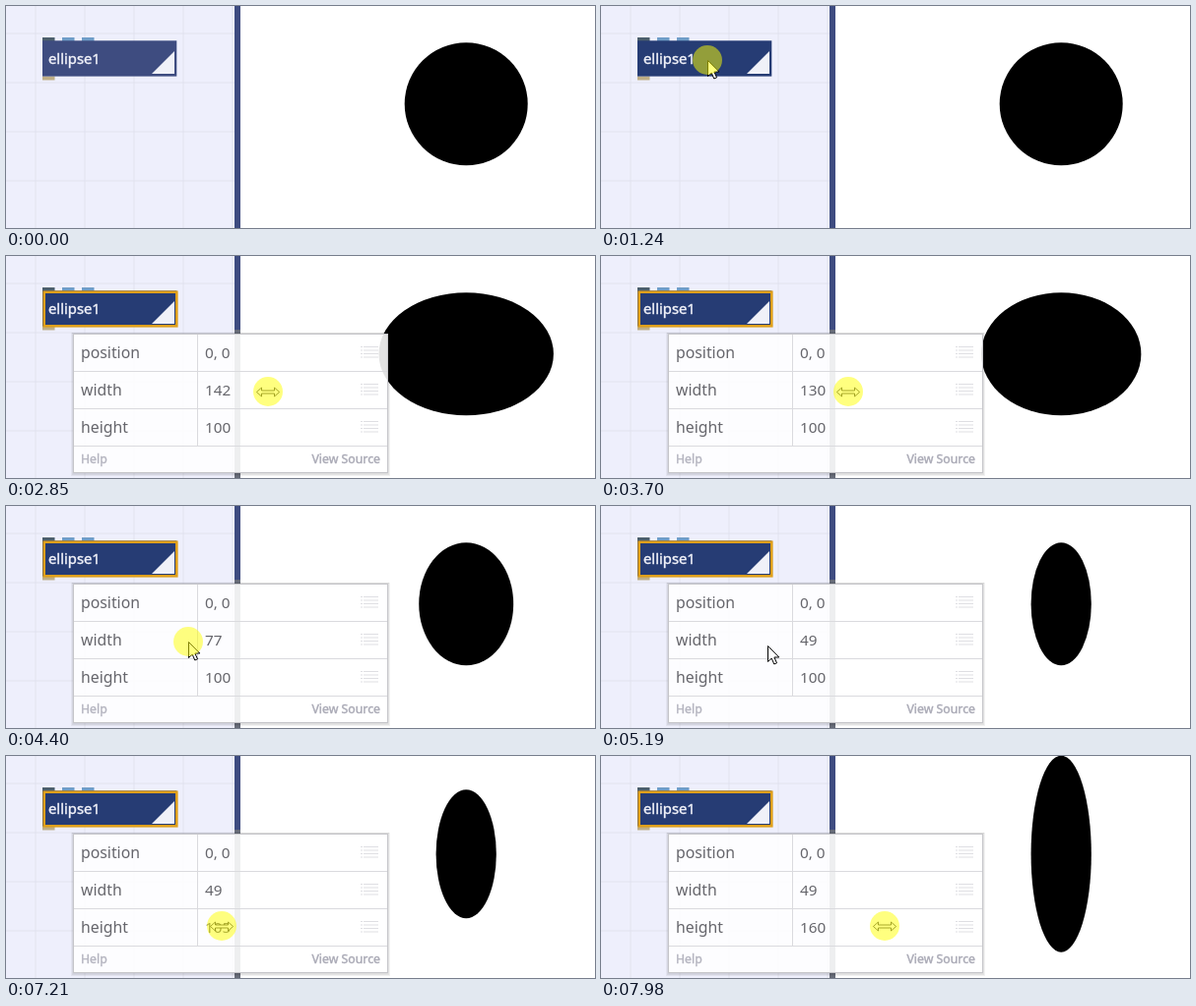
Write an HTML page that moves like this. It is 598 px wide and 226 px high and loops after 8000 ms.

```html
<!DOCTYPE html>
<html lang="en">
<head>
<meta charset="utf-8">
<title>Ellipse node</title>
<style>
  html, body { margin: 0; width: 100%; height: 100%; overflow: hidden; background: #fff; }
  svg { display: block; font-family: "Noto Sans", "Open Sans", sans-serif; }
  .label { font-size: 15.8px; fill: #66666c; }
  .value { font-size: 15.3px; fill: #66666c; }
  .title, .small { stroke: currentColor; fill: currentColor; stroke-width: .4px; }
  .title { font-size: 14.8px; color: #f2f3fa; }
  .small { font-size: 12.3px; color: #b5b5c0; }
  .link { color: #a9a9b5; }
</style>
</head>
<body>
<svg width="598" height="226" viewBox="0 0 598 226">
  <defs>
    <pattern id="grid" width="50" height="50" x="29.5" y="27.5" patternUnits="userSpaceOnUse">
      <path d="M.5 0V50M0 .5H50" stroke="#e1e2ee"/>
    </pattern>
  </defs>
  <rect width="232" height="226" fill="#eeeffc"/>
  <rect width="232" height="226" fill="url(#grid)"/>
  <rect x="232" width="6" height="226" fill="#3e4c80"/>
  <rect id="scrollShade" x="232" y="75" width="6" height="151" fill="#676c78"/>
  <ellipse id="shape" cx="467.2" cy="99.7"/>

  <path d="M37 32h12.5v4H37z" fill="#4c5f6c"/>
  <path d="M57 32h12.5v4H57zM77 32h12.5v4H77z" fill="#6f9dc8"/>
  <path d="M37 71.5h12.5v4H37z" fill="#bfae86"/>
  <rect id="node" x="37" y="35.3" width="136.3" height="36.3"/>
  <path d="M148 69L171 46V69z" fill="#f0f1f8"/>
  <rect id="selection" x="38.7" y="36.7" width="134.6" height="34.6" fill="none" stroke="#dfa01c" stroke-width="2.6"/>
  <text class="title" x="43" y="59">ellipse1</text>

  <g id="panel">
    <g fill="none" stroke="#000">
      <rect x="66.5" y="78.5" width="323" height="145" opacity=".05"/>
      <rect x="67.5" y="78.5" width="321" height="144" opacity=".11"/>
      <rect x="68.5" y="79.5" width="319" height="142" opacity=".13"/>
    </g>
    <rect x="68.5" y="79.5" width="319" height="141" fill="#fff" fill-opacity=".89" stroke="#c6c6ca"/>
    <path d="M69 117.5H387M69 155.5H387M69 193.5H387M194.5 80V193" stroke="#dadade"/>
    <g id="rows"></g>
    <text class="small" x="76" y="211">Help</text>
    <text class="small link" x="380" y="211" text-anchor="end">View Source</text>
  </g>

  <g id="pointer">
    <path id="arrow" d="M.5 .5V16.5L4.2 13.1L6.8 19L9.5 17.8L6.9 12H11.8z" fill="#fff" stroke="#000"/>
    <path id="resize" d="M-11.5 .5L-6.5-4V-1H6.5V-4L11.5 .5L6.5 5V2H-6.5V5z" fill="#fff" stroke="#222" stroke-width=".8"/>
    <circle id="press" r="15" fill="#ff0" fill-opacity=".5"/>
  </g>
</svg>
<script>
  const LOOP = 8000, STEP = 77.48, LEAD = 20, ZOOM = 1.25;
  const $ = id => document.getElementById(id);

  $('rows').innerHTML = ['position', 'width', 'height'].map((name, i) => {
    const y = 38 * i;
    const icon = [92.5, 96, 99.5, 103].map(v => `M360 ${v + y}h2m1 0h15`).join('');
    return `<text class="label" x="76" y="${104 + y}">${name}</text>
      <text class="value" id="${name}" x="202" y="${104 + y}">0, 0</text>
      <path d="${icon}" stroke="#dfdfe3"/>`;
  }).join('');

  const progress = (t, from, to) => Math.min(1, Math.max(0, (t - from) / (to - from)));
  const easeOut = (...span) => 1 - (1 - progress(...span)) ** 1.5;
  const easeInOut = (...span) => {
    const u = progress(...span);
    return u * u * (3 - 2 * u);
  };
  const within = (t, from, to) => t >= from && t < to;
  const show = (id, on) => $(id).setAttribute('visibility', on ? 'visible' : 'hidden');

  function draw(t) {
    const w = 100 + 88 * easeOut(t, 2634, 3298) - 88 * easeOut(t, 3310, 4107)
      - 51 * easeOut(t, 4107, 5036);
    const h = 100 - 48 * easeOut(t, 5811, 6586) + 150 * easeOut(t, 7050, 7670)
      - 42.6 * easeOut(t, 7670, 8000);

    // Dragging moves the pointer along with the edited value.
    const enter = easeInOut(t, 78, 775), toWidth = easeInOut(t, 1860, 2402);
    const x = 299 - 191 * enter + 106 * toWidth + 62.3 * easeInOut(t, 4970, 5578)
      + ZOOM * (w - 100 + h - 100);
    const y = 196 - 141 * enter + 83 * toWidth + 35 * easeInOut(t, 5080, 5578);

    const open = t >= 1300, visible = t >= 150;
    const hover = open || (visible && x < 173 && y < 72);
    const resizing = open && x > 195;

    $('shape').setAttribute('rx', w * ZOOM / 2);
    $('shape').setAttribute('ry', h * ZOOM / 2);
    $('width').textContent = Math.round(w);
    $('height').textContent = Math.round(h);
    $('node').setAttribute('fill', hover ? '#263c74' : '#3e4c80');
    for (const id of ['panel', 'selection', 'scrollShade']) show(id, open);

    $('pointer').setAttribute('transform', `translate(${Math.round(x)} ${Math.round(y)})`);
    show('arrow', visible && !resizing);
    show('resize', visible && resizing);
    show('press', within(t, 1230, 1380) || within(t, 2600, 5030) || t >= 5800);
  }

  const start = performance.now();
  function tick() {
    const t = (performance.now() - start) % LOOP;
    draw(Math.floor((t + LEAD) / STEP) * STEP);
    requestAnimationFrame(tick);
  }
  tick();
</script>
</body>
</html>
```
